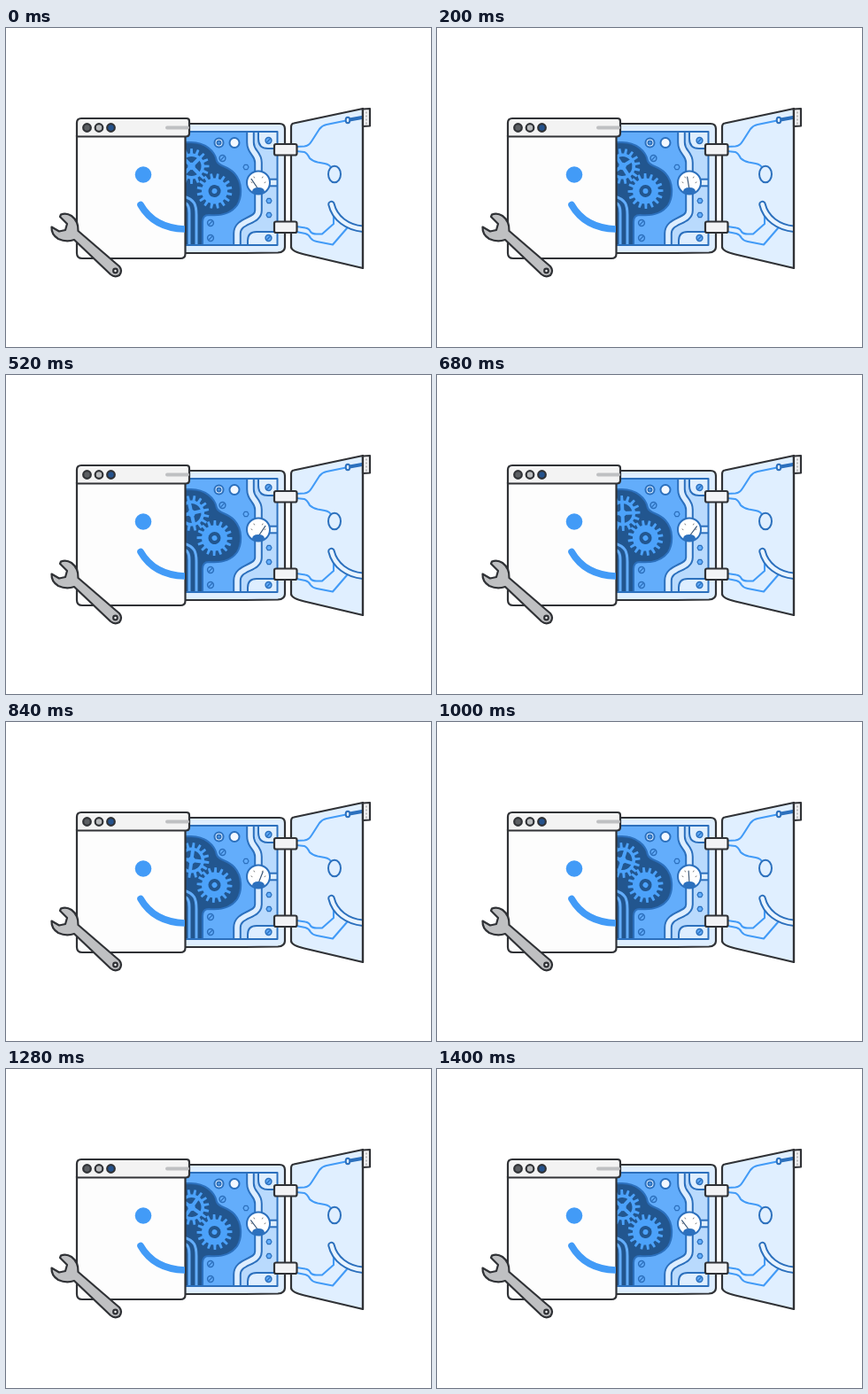
An HTML page for the animation above (1440 ms loop, 480 by 360 pixels).

```html
<!DOCTYPE html>
<html>
<head>
<meta charset="utf-8">
<style>
html, body { margin: 0; width: 100%; height: 100%; overflow: hidden; background: #fff; }
svg { display: block; width: 480px; height: 360px; }
path { stroke-linecap: round; stroke-linejoin: round; }
.ink { stroke: #303236; stroke-width: 2.2; }
.edge { stroke: #2c70bd; stroke-width: 2; }
.wire { fill: none; stroke: #429bf7; stroke-width: 2.1; }
.pipe { fill: none; stroke: #2c70bd; stroke-width: 9.6; stroke-linecap: butt; }
.core { fill: none; stroke: #deeeff; stroke-width: 5.6; stroke-linecap: butt; }
</style>
</head>
<body>
<svg viewBox="0 0 480 360" fill="none">
  <defs>
    <clipPath id="inside"><rect x="190" y="117" width="117" height="128"/></clipPath>
    <clipPath id="doorArea"><rect x="322" y="90" width="81" height="181"/></clipPath>
    <clipPath id="windowArea"><rect x="80" y="122" width="122" height="138"/></clipPath>
    <path id="duct" d="M276 116V129C276 141 285 141 285 152V206C285 219 261 216 261 232V246"/>
    <path id="grin" d="M367.500 199C371 214 385 226 406 227"/>
    <g id="screw"><circle r="3.400" fill="#63adfb" stroke="#2c70bd" stroke-width="1.500"/><path d="M-1.500 1.500l3-3" stroke="#2c70bd" stroke-width="1.300"/></g>
    <path id="nut" d="M-3 0l1.500-2.700h3L3 0 1.500 2.700h-3z" fill="#63adfb" stroke="#2c70bd" stroke-width="1.200"/>
  </defs>

  <!-- cabinet -->
  <path class="ink" fill="#deeeff" d="M195 108H309Q315 108 315 114V247Q315 253 307 253.500L270 254H195Z"/>
  <g clip-path="url(#inside)">
    <rect x="190" y="117" width="117" height="128" fill="#63adfb"/>
    <path fill="#b9dafd" d="M276 116V129C276 141 285 141 285 152V206C285 219 261 216 261 232V246H307V116Z"/>
    <path class="edge" fill="#22568f" d="M195 129H209C225 129 236 139 238 150C241 157 250 155 258 164C267 174 267 190 261 200C253 211 239 212 229 211Q222 211 222 219V246H195Z"/>
    <g id="backGear"></g>
    <g id="frontGear"></g>
    <path d="M199 196C206 198 207 202 207 209V246M201 190C213 194 215 199 215 211V246" stroke="#63adfb" stroke-width="3"/>
    <use href="#duct" class="pipe"/><use href="#duct" class="core"/>
    <path class="edge" fill="#deeeff" d="M285 116V125Q285 136 296 136H308V116ZM308 230H283Q273 230 273 240V246H308Z"/>
    <path class="pipe" d="M296 174.500H308"/><path class="core" d="M296 174.500H308"/>
    <use href="#screw" x="296.500" y="127"/><use href="#screw" x="296.500" y="237"/>
    <use href="#screw" x="244.500" y="147"/><use href="#screw" x="231" y="220"/><use href="#screw" x="231" y="237"/>
    <use href="#nut" x="271" y="157"/><use href="#nut" x="297" y="195"/><use href="#nut" x="297" y="211"/>
    <circle class="edge" cx="240.500" cy="129.500" r="5" fill="#deeeff"/>
    <circle class="edge" cx="240.500" cy="129.500" r="2" fill="#63adfb"/>
    <circle class="edge" cx="258" cy="129.500" r="5.500" fill="#f3f8ff"/>
  </g>
  <path class="edge" d="M195 117H306.500V245H195"/>
  <circle class="edge" cx="285" cy="174.500" r="13" fill="#fff"/>
  <path d="M277 174l1 .5M280 168l.5 1M290 168l-.5 1M293 174l-1 .5" stroke="#777" stroke-width="1"/>
  <path id="needle" d="M285 182V168" stroke="#3c5878" stroke-width="1.200"/>
  <path fill="#2c70bd" d="M278 185Q278 180 285 180T292 185Q285 190 278 185Z"/>

  <!-- door -->
  <path class="ink" fill="#e0efff" d="M325 107.500L403 91V271L337 255.500Q322 252 322 247V112Q322 108 325 107.500Z"/>
  <path class="wire" d="M328 134L337 133.500Q342 133 345 128L354 114Q357 110 362 109L384 104.500M328 139L337 140Q340 141 343 147Q346 150 352 151.500L360 153Q366 154 368 159"/>
  <path class="wire" d="M328 224L338 225.500Q342 226 344 230Q346 232.500 351 232.500H357L370 221V212M328 230L338 232Q342 233 344 237Q346 240 351 241L369 244.500 385 226"/>
  <path d="M388 103.500L402 101" stroke="#2c70bd" stroke-width="4"/>
  <ellipse class="edge" cx="386" cy="104" rx="2.300" ry="3.200" fill="#e0efff"/>
  <ellipse class="edge" cx="371" cy="165" rx="7" ry="9.300" fill="#e0efff"/>
  <g clip-path="url(#doorArea)">
    <use href="#grin" stroke="#2c70bd" stroke-width="8.400"/><use href="#grin" stroke="#e9f4ff" stroke-width="4.400"/>
  </g>
  <path class="ink" d="M403 91V271"/>
  <path class="ink" fill="#f3f3f4" d="M403 91.500L411 91V110.500L403 111Z"/>
  <path d="M407 95V108" stroke="#aaa" stroke-width="1.500" stroke-dasharray="1 3"/>
  <rect class="ink" x="303" y="131" width="25.500" height="12.500" rx="2" fill="#f2f3f5"/>
  <rect class="ink" x="303" y="218.500" width="25.500" height="12.500" rx="2" fill="#f2f3f5"/>

  <!-- window -->
  <path class="ink" fill="#fdfdfd" d="M80 121H202.500V255Q202.500 260 197 260H86Q80 260 80 254Z"/>
  <path class="ink" fill="#f3f3f3" d="M80 122.500V107Q80 102 85 102H204Q207 102 207 105V119Q207 122.500 203 122.500Z"/>
  <path d="M182 112.500H205" stroke="#bfc0c2" stroke-width="4"/>
  <g class="ink" stroke-width="2">
    <circle cx="91.500" cy="112.500" r="4.300" fill="#5c5f63"/>
    <circle cx="105" cy="112.500" r="4.300" fill="#b9bbbd"/>
    <circle cx="118.500" cy="112.500" r="4.300" fill="#25528c"/>
  </g>
  <circle cx="155" cy="165.500" r="9.300" fill="#429bf7"/>
  <path d="M152 199.500C162 217 179 227 205 227" stroke="#429bf7" stroke-width="7.600" clip-path="url(#windowArea)"/>

  <!-- wrench -->
  <path class="ink" fill="#bfc0c2" d="M62 210.500Q68 208 74 212Q82 218 81.500 229L128 269Q132 274 128 279Q123 282 118 278L77 239Q68 242 59 238Q51 233 51.500 224.500L60 229.500 67 228 69 221 61 213Z"/>
  <circle class="ink" cx="123.500" cy="274" r="2.300" fill="#fff"/>
</svg>
<script>
const LOOP = 1440;
const $ = id => document.getElementById(id);

function gearPath(teeth, outer, inner) {
  const points = [];
  for (let i = 0; i < teeth; i++) {
    for (const [offset, r] of [[-.28, inner], [-.17, outer], [.17, outer], [.28, inner]]) {
      const a = (i + offset) / teeth * 2 * Math.PI;
      points.push((r * Math.cos(a)).toFixed(2) + ' ' + (r * Math.sin(a)).toFixed(2));
    }
  }
  return 'M' + points.join('L') + 'Z';
}

const gearBody = `<path d="${gearPath(16, 20, 14.5)}" fill="#4ca2fa"/>`;
$('backGear').innerHTML = gearBody + `
  <circle r="11" fill="#22568f"/>
  <path d="M-12 0H12M0-12V12" stroke="#4ca2fa" stroke-width="4"/>
  <circle r="4" fill="#4ca2fa"/>`;
$('frontGear').innerHTML = gearBody + `
  <circle r="7" fill="#22568f"/><circle r="3" fill="#4ca2fa"/>`;

function draw(now) {
  const phase = now % LOOP / LOOP;
  const turn = phase * 90;
  const swing = 38 * Math.cos(2 * Math.PI * (phase - 620 / LOOP));
  $('backGear').setAttribute('transform', `translate(209.500 156) rotate(${45 + turn})`);
  $('frontGear').setAttribute('transform', `translate(235.500 184) rotate(${11.25 - turn})`);
  $('needle').setAttribute('transform', `rotate(${swing} 285 182)`);
  requestAnimationFrame(() => draw(performance.now()));
}
draw(performance.now());
</script>
</body>
</html>
```
